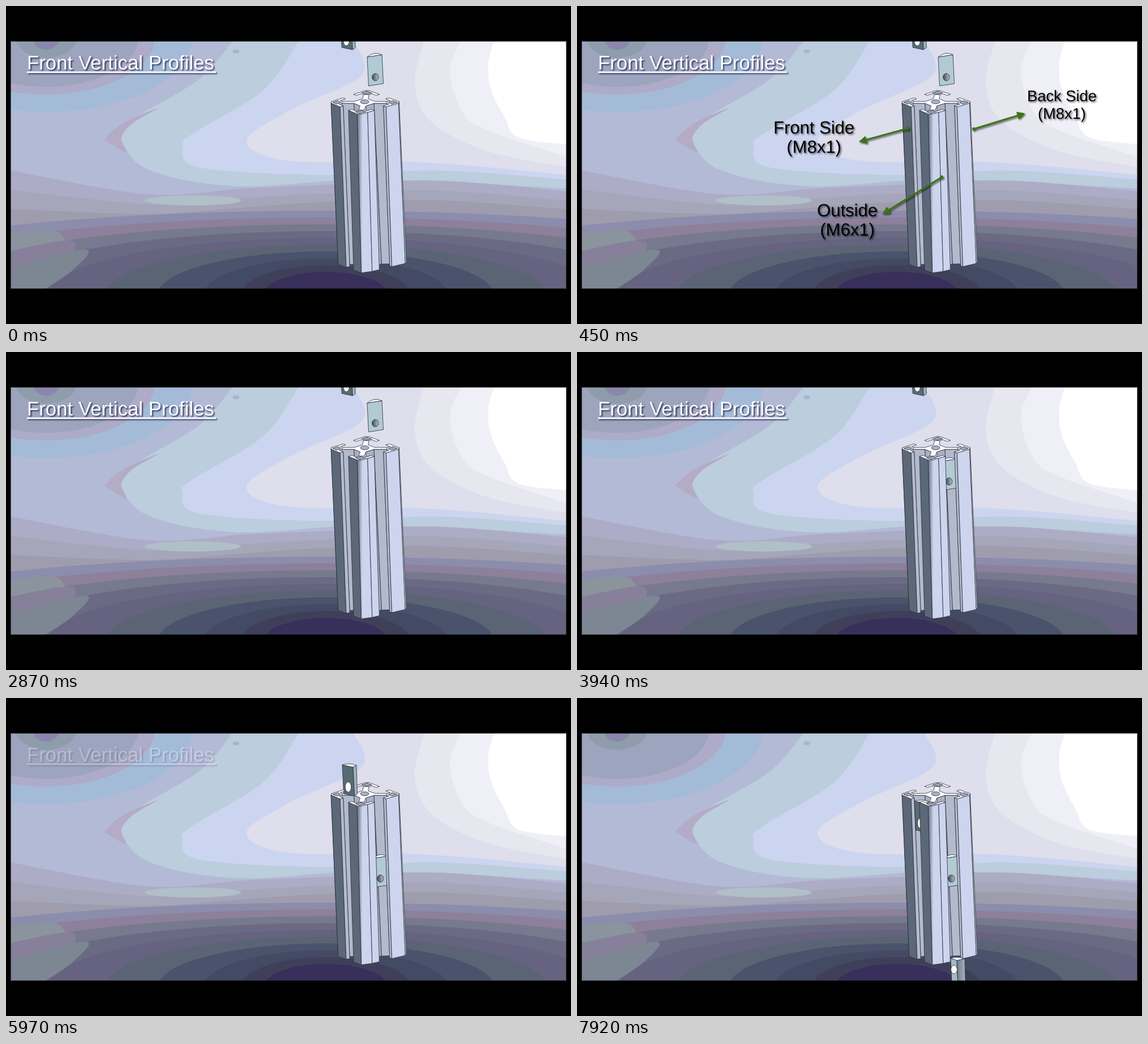
Write an HTML page that moves like this. It is 998 px wide and 561 px high and loops after 8000 ms.

```html
<!DOCTYPE html>
<html lang="en">
<head>
<meta charset="utf-8">
<title>Front Vertical Profiles</title>
<style>
  html, body { margin: 0; width: 100%; height: 100%; overflow: hidden; background: #000; }
  svg { display: block; width: 100vw; height: 100vh; }
  text { font-family: "Liberation Sans", Arial, sans-serif; text-rendering: geometricPrecision; }
  #labels { text-anchor: middle; font-size: 31px; filter: drop-shadow(2px 2px 1.5px #0009); }
  #title { fill: #fff; font-size: 34.8px; filter: drop-shadow(2px 2px 1.2px #1c2048d0); }
  #arrows { stroke: #397512; fill: #397512; stroke-width: 3; }
  #rear, #nuts, #front { stroke: #262b38; stroke-width: .8; stroke-linejoin: round; }
</style>
</head>
<body>
<svg viewBox="0 0 998 561">
  <defs>
    <clipPath id="panel"><path d="M8 62H990V499H8Z"/></clipPath>
    <linearGradient id="round">
      <stop offset="0" stop-color="#657182"/><stop offset=".35" stop-color="#ccd4ee"/>
    </linearGradient>
    <linearGradient id="bore">
      <stop offset="0" stop-color="#3f4a52"/><stop offset="1" stop-color="#b4c0c6"/>
    </linearGradient>
    <linearGradient id="steel">
      <stop offset="0" stop-color="#6f7d8c"/><stop offset="1" stop-color="#a9b5c0"/>
    </linearGradient>
  </defs>

  <g clip-path="url(#panel)">
    <rect x="8" y="62" width="982" height="437" fill="#fff"/>
    <g id="backdrop"></g>
    <g id="rear"></g>
    <g id="nuts"></g>
    <g id="front"></g>
    <rect x="8.5" y="62.5" width="981" height="436" fill="none" stroke="#0008"/>
  </g>

  <g id="title">
    <text x="37" y="112">Front Vertical Profiles</text>
    <rect x="37" y="115.5" width="334" height="2.7"/>
  </g>
  <g id="labels">
    <text x="418.5" y="225">Front Side</text><text x="418.5" y="259">(M8x1)</text>
    <text x="477.5" y="370.5">Outside</text><text x="477.5" y="405">(M6x1)</text>
    <g font-size="27.3"><text x="856.5" y="168">Back Side</text><text x="856.5" y="199">(M8x1)</text></g>
    <g id="arrows"></g>
  </g>
</svg>

<script>
const $ = id => document.getElementById(id);
const mix = (a, b, k) => a + (b - a) * k;

function add(parent, tag, attrs) {
  const el = document.createElementNS('http://www.w3.org/2000/svg', tag);
  for (const k in attrs) el.setAttribute(k, attrs[k]);
  return $(parent).appendChild(el);
}
const path = (parent, fill, d) => add(parent, 'path', { fill, d });
const oval = (parent, fill, cx, cy, rx, ry) => add(parent, 'ellipse', { fill, cx, cy, rx, ry });

// Smooth curve through the points
function curve(p) {
  let d = 'M' + p[0];
  for (let i = 0; i < p.length - 1; i++) {
    const a = p[i - 1] || p[i], b = p[i], c = p[i + 1], e = p[i + 2] || c;
    const lead = b.map((v, j) => v + (c[j] - a[j]) / 6);
    const trail = c.map((v, j) => v - (e[j] - b[j]) / 6);
    d += `C${lead} ${trail} ${c}`;
  }
  return d;
}
const points = text => text.split(' ').map(pair => pair.split(',').map(Number));
const band = (fill, p) => path('backdrop', fill, curve(p) + 'L990 499L8 499L8 62Z');

// Sky: light falls from the upper right
band('#efeff8', points('862,62 852,100 856,145 880,195 905,232 990,244'));
band('#e7e7ef', points('803,62 784,115 805,185 850,219 990,266'));
band('#dedeec', points('738,62 722,140 752,205 850,256 990,284'));
band('#ccd5ef', points('614,62 628,122 500,185 425,238 500,273 740,276 990,298'));
band('#bccddd', points('517,62 455,148 330,225 312,248 342,285 560,298 760,290 990,306'));
band('#b3bad6', points('400,62 340,130 225,200 205,237 255,290 410,318 650,306 990,322'));
path('backdrop', '#b4abc7', curve(points('173,236 205,208 268,180 222,208 203,235 212,258 173,236')));

// Rings in the upper left corner
[[258, '#a4bbd8'], [192, '#adabc7'], [163, '#9da4be'], [54, '#8f9cab'], [24, '#8a87ac']]
  .forEach(([r, color]) => oval('backdrop', color, 71, 55, r, .47 * r + 11));
oval('backdrop', '#a9b5cb', 406, 80, 6, 3.5);

// Horizon, then the dark floor
const high = [290, 332, 322, 316, 308, 327], low = [392, 384, 372, 361, 360, 374];
['#adacc6', '#a6a6ba', '#9f9cad'].forEach((color, i) =>
  band(color, [8, 250, 420, 560, 760, 990].map((x, j) => [x, mix(high[j], low[j], i / 3)])));
oval('backdrop', '#b1bfc8', 330, 343, 85, 9);
['#8c8cad', '#8d809a', '#77798f', '#6b6a84', '#65637f', '#5a6475', '#4a536b', '#434a63', '#403f5a', '#392f5b']
  .forEach((color, i) => oval('backdrop', color, 565, 510, 110 + 870 * (1 - i / 9) ** 1.4, 149 - 12 * i));

// Cloudy patches at the lower left
['#8b949c', '#86809a', '#7d8794'].forEach((color, i) =>
  path('backdrop', color, curve([[8, 402 + 30 * i], [90 + 25 * i, 398 + 16 * i], [100 + 10 * i, 440 + 12 * i], [30 + 20 * i, 499]]) + 'L8 499Z'));

// The profile: a square section (u, v from -1 to 1) drawn out from top (h = 0) to bottom (h = 1)
const corners = [
  [[571, 170], [624, 192], [638, 148], [698, 170]],
  [[584, 455], [631, 472], [663, 436], [710, 453]]
];
function at([u, v], h = 0) {
  const [a, b, c, d] = corners[h], s = (u + 1) / 2, t = (v + 1) / 2;
  return [0, 1].map(j => mix(mix(a[j], b[j], s), mix(c[j], d[j], s), t));
}
const turn = (k, [u, v]) => k ? turn(k - 1, [v, -u]) : [u, v];
const face = (parent, fill, p) => path(parent, fill, 'M' + p.map(q => at(q)).join('L') + 'Z');
const wall = (parent, fill, p, q) =>
  path(parent, fill, `M${at(p)}L${at(q)}L${at(q, 1)}L${at(p, 1)}Z`);

const gap = .28, lip = .84, cut = .88;
const half = [[.7, .55], [lip, .55], [lip, gap], [1, gap], [1, cut]];
const rim = [...half, ...half.map(([u, v]) => [v, u]).reverse()];
const hollow = [[.9, .62], [.9, .9], [.62, .9], [.66, .66]];
function corner(parent, k) {
  face(parent, '#fff', rim.map(p => turn(k, p)));
  face(parent, '#a0a8ba', hollow.map(p => turn(k, p)));
}

for (const [k, s] of [[0, 1], [1, -1]]) {
  const inner = (fill, p, q) => wall('rear', fill, turn(k, p), turn(k, q));
  inner('#a9b0c6', [.36, -.2], [.36, .2]);
  inner('#b3bacd', [.36, .2 * s], [.7, .55 * s]);
  inner('#b6bccf', [lip, gap * s], [1, gap * s]);
}
corner('rear', 3);
face('rear', '#fff', [0, 1, 2, 3].flatMap(k =>
  [[.55, .7], [.7, .55], [.36, .2], [.36, -.2]].map(p => turn(k, p))));
oval('rear', '#a9b1c8', 633.5, 169, 7.5, 3.5);

const dark = '#5c6878', bright = '#cdd4ee';
wall('front', dark, [-1, -cut], [-cut, -1]);
wall('front', dark, [-cut, -1], [-gap, -1]);
wall('front', '#b6bccf', [-gap, -1], [-gap, -lip]);
wall('front', dark, [gap, -1], [.86, -1]);
wall('front', 'url(#round)', [.86, -1], [1, -.6]);
wall('front', bright, [1, -.6], [1, -gap]);
wall('front', '#b6bccf', [lip, gap], [1, gap]);
wall('front', bright, [1, gap], [1, cut]);
wall('front', '#dcdeee', [1, cut], [cut, 1]);
for (const k of [2, 1, 0]) corner('front', k);

// A slot nut: face, side, cap and threaded hole
function nut(o) {
  const { id, x, y, w, slope, side, rise, lift, height } = o, r = x + w, b = y + slope;
  add('nuts', 'g', { id });
  path(id, o.face, `M${x} ${y}L${r} ${b}l2.5 ${height}l${-w} ${-slope}Z`);
  if (side) path(id, o.tint, `M${r} ${b}l${side} ${-rise}l1.5 ${height}L${r + 2.5} ${b + height}Z`);
  path(id, '#f6f8fb', `M${x} ${y}L${r} ${b}l${side} ${-rise}Q${x + (w + side) / 2} ${y - lift} ${x} ${y}Z`);
  oval(id, o.bore, x + w * .55, y + o.drop, o.rx, o.ry);
}
nut({ id: 'nutA', x: 638, y: 90, w: 26, slope: -4, side: 0, rise: 0, lift: 11, height: 51,
  face: '#b2cad4', bore: 'url(#bore)', drop: 35.5, rx: 5.7, ry: 6.5 });
nut({ id: 'nutB', x: 594, y: 118, w: 19, slope: 4, side: 6, rise: 3.5, lift: 4, height: 51,
  face: '#586b72', tint: '#9db3ba', bore: '#fff', drop: 39, rx: 5.3, ry: 9 });
nut({ id: 'nutC', x: 660, y: 459, w: 11, slope: 4, side: 14, rise: 3, lift: 4, height: 55,
  face: '#a4bac2', tint: 'url(#steel)', bore: '#fff', drop: 20, rx: 5.5, ry: 7.5 });

// Callouts: dot, line, head
function arrow(x1, y1, x2, y2) {
  const len = Math.hypot(x2 - x1, y2 - y1), deg = Math.atan2(y2 - y1, x2 - x1) * 180 / Math.PI;
  const place = { transform: `translate(${x1} ${y1}) rotate(${deg})` };
  add('arrows', 'path', { ...place, d: `M0 0H${len - 8}M${len - 1} 0l-9 -4.5v9z` });
  add('arrows', 'circle', { ...place, r: 1.5 });
}
arrow(584, 216, 500, 239);
arrow(644, 302, 541, 366);
arrow(701, 217, 789, 190);

// Number of steps done at time t
const steps = (t, start, pitch, count) =>
  Math.max(0, Math.min(count, Math.floor((t - start) / pitch + 1e-6) + 1));
const move = (id, x, y) => $(id).setAttribute('transform', `translate(${x} ${y})`);

function draw(t) {
  $('labels').style.opacity = (steps(t, 30, 30, 15) - steps(t, 2450, 30, 15)) / 15;
  $('title').style.opacity = 1 - steps(t, 5420, 30, 26) / 26;
  const a = steps(t, 3030, 130, 15);
  move('nutA', .6 * a, 12.87 * a);
  const b = steps(t, 4980, 123.7, 13) + steps(t, 6600, 130, 2) - 9;
  move('nutB', .37 * b, 10.65 * b);
  const c = 4 - steps(t, 7530, 130, 4);
  move('nutC', -.5 * c, 12.87 * c);
}

const begin = performance.now();
function tick() {
  draw((performance.now() - begin) % 8000);
  requestAnimationFrame(tick);
}
tick();
</script>
</body>
</html>
```
